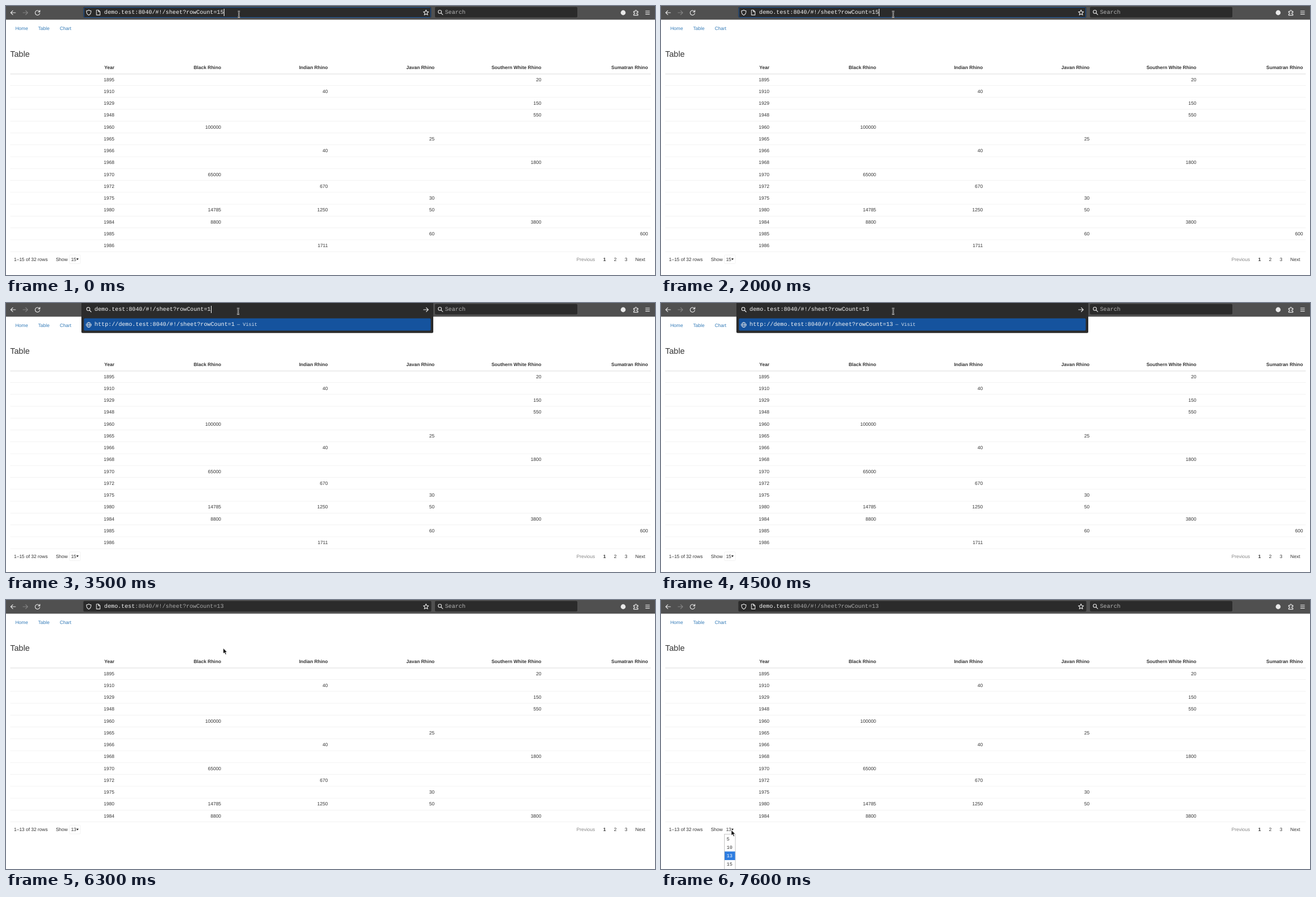
An HTML page that plays this animation: 1162x482 px, repeating every 8 s.

```html
<!DOCTYPE html>
<html lang="en">
<head>
<meta charset="utf-8">
<title>Table paging</title>
<style>
  html, body { margin: 0; width: 100%; height: 100%; overflow: hidden; background: #fff; }
  svg { display: block; width: 1162px; height: 482px; }
  text { font: 8.51px "Liberation Sans", Arial, sans-serif; fill: #333; text-rendering: geometricPrecision; white-space: pre; }
  .bold { font-weight: 700; }
  .right { text-anchor: end; }
  .mono { font: 10.2px "Liberation Mono", "Courier New", monospace; fill: #f6f6f6; }
  .small { font-size: 8.6px; }
  .link { fill: #337ab7; }
  .icon { fill: none; stroke: #e8e8e8; stroke-width: 1.1; stroke-linecap: round; stroke-linejoin: round; }
</style>
</head>
<body>
<svg id="stage" viewBox="0 0 1162 482" xmlns="http://www.w3.org/2000/svg">
  <rect width="1162" height="482" fill="#fff"/>
  <g id="page">
    <text class="link" x="16.7" y="42.6">Home</text>
    <text class="link" x="57.6" y="42.6">Table</text>
    <text class="link" x="96.2" y="42.6">Chart</text>
    <text x="7.4" y="91.3" style="font-size:14.6px">Table</text>
    <rect x="7.5" y="121.2" width="1147" height="1.2" fill="#000" opacity=".12"/>
    <g id="table"></g>
    <g id="pager">
      <text id="info" x="14.2" y="456.8"></text>
      <text x="89.2" y="456.8">Show</text>
      <rect id="selectBox" x="113.6" y="446" width="19.6" height="15.6" rx="1.5" fill="none" stroke="#ececec" stroke-width=".7"/>
      <text id="size" x="116.4" y="456.8"></text>
      <path d="M126 452.2h4l-2 3.4z" fill="#222"/>
      <text x="1021.5" y="456.8" style="fill:#868686">Previous</text>
      <text class="bold" x="1069.2" y="456.8">1</text>
      <text x="1088.5" y="456.8">2</text>
      <text x="1107.7" y="456.8">3</text>
      <text x="1126.8" y="456.8">Next</text>
    </g>
    <g id="menu">
      <rect x="113.5" y="419.8" width="19.6" height="70" fill="#fff" stroke="#aaa" stroke-width=".7"/>
      <rect x="114" y="450.6" width="18.7" height="15.4" fill="#2e7de0"/>
    </g>
  </g>

  <rect width="1162" height="24.5" fill="#505050"/>
  <g class="icon">
    <path d="M17 12H8.6m3.6-3.7L8.5 12l3.7 3.7"/>
    <path d="M30.4 12h8.4m-3.6-3.7L38.9 12l-3.7 3.7" stroke="#858585"/>
    <path d="M60.2 10.4a4.2 4.2 0 1 0 .3 2.7M60.7 7.6v3h-3"/>
    <circle cx="1105" cy="12" r="4.4" fill="#e8e8e8" stroke="none"/>
    <path d="M1123.8 9.6h2.6v-.7a1.4 1.4 0 0 1 2.8 0v.7h2.3v2.3h-1a1.3 1.3 0 0 0 0 2.6h1v2.1h-7.7v-2.1h.8a1.3 1.3 0 0 0 0-2.6h-.8z"/>
    <path d="M1145.2 9h7m-7 2.8h7m-7 2.8h7"/>
  </g>
  <rect x="768" y="1.8" width="255" height="18.8" rx="2" fill="#2b2b2b"/>
  <g class="icon"><circle cx="776.8" cy="10.4" r="2.9"/><path d="M779 12.6l3 3"/></g>
  <text class="mono" x="786" y="14.3" style="fill:#b4b4b4">Search</text>

  <rect id="field" x="138.5" y="1.8" width="623" height="19" rx="2" fill="#2b2b2b"/>
  <rect id="focusRing" x="139.5" y="2.5" width="621" height="18" rx="2" fill="none" stroke="#15539e"/>
  <g id="popup">
    <rect x="135" y="-3" width="630" height="56.7" rx="2" fill="#2b2b2b"/>
    <rect x="139.5" y="27.6" width="621" height="22" rx="2" fill="#15539e"/>
    <g class="icon" style="stroke-width:.9">
      <circle cx="148.2" cy="39.2" r="4.4"/>
      <ellipse cx="148.2" cy="39.2" rx="1.9" ry="4.4"/>
      <path d="M143.8 39.2h8.8"/>
    </g>
    <text id="suggestion" class="mono" x="158.6" y="41.2"></text>
    <text id="visit" class="mono small" y="41.2" style="fill:#dce6f2">— Visit</text>
  </g>
  <g id="siteIcons" class="icon">
    <path d="M148.2 7.3q2 1.5 4 1.3.5 5.6-4 7.8-4.5-2.2-4-7.8 2 .2 4-1.3z"/>
    <path d="M162 7.3h3.6l2.8 2.8v6h-6.4zM165.5 7.5v2.8h2.8"/>
    <path id="star"/>
  </g>
  <g id="typingIcons" class="icon">
    <circle cx="147.3" cy="10.8" r="2.9"/><path d="M149.5 13l3 3"/>
    <path d="M747.6 12h8.4m-3.6-3.7L756.1 12l-3.7 3.7"/>
  </g>
  <text class="mono" y="14.3" id="address"><tspan id="host"></tspan><tspan id="path"></tspan></text>
  <rect id="caret" y="5" width="1" height="13" fill="#fff"/>

  <g id="beam" fill="none">
    <path d="M-2 0q2 0 2 1.5v7.5q0 1.5-2 1.5M2 0q-2 0-2 1.5M0 9q0 1.5 2 1.5" stroke="#f4f4f4" stroke-width="2.2"/>
    <path d="M-2 0q2 0 2 1.5v7.5q0 1.5-2 1.5M2 0q-2 0-2 1.5M0 9q0 1.5 2 1.5" stroke="#111" stroke-width=".9"/>
  </g>
  <path id="arrow" d="M0 0v9.4l2.2-2 1.7 3.8 1.6-.7-1.7-3.7h3z" fill="#000" stroke="#fff" stroke-width=".6"/>
</svg>
<script>
const LOOP = 8000, STEP = 100, CHAR = 6.12, ROW = 21.265, COLUMN = 191.1;
const HOST = 'demo.test', PATH = ':8040/#!/sheet?rowCount=';
const $ = id => document.getElementById(id);
const show = (id, on) => $(id).setAttribute('display', on ? 'inline' : 'none');
const moveTo = (id, x, y) => $(id).setAttribute('transform', `translate(${x} ${y})`);

function add(parent, tag, attrs, content = '') {
  const node = document.createElementNS('http://www.w3.org/2000/svg', tag);
  for (const key in attrs) node.setAttribute(key, attrs[key]);
  node.textContent = content;
  return parent.appendChild(node);
}

function cell(parent, column, y, content, weight = '') {
  add(parent, 'text', { x: 194 + COLUMN * column, y, class: 'right ' + weight }, content);
}

// Each row: year, then column:count pairs.
const rows = `1895 4:20|1910 2:40|1929 4:150|1948 4:550|1960 1:100000|1965 3:25|1966 2:40|1968 4:1800
1970 1:65000|1972 2:670|1975 3:30|1980 1:14785 2:1250 3:50|1984 1:8800 4:3800|1985 3:60 5:600|1986 2:1711`
  .split(/[|\n]/);

['Year', 'Black Rhino', 'Indian Rhino', 'Javan Rhino', 'Southern White Rhino', 'Sumatran Rhino']
  .forEach((name, i) => cell($('table'), i, 113.4, name, 'bold'));

const rowNodes = rows.map((row, i) => {
  const group = add($('table'), 'g', {});
  const [year, ...counts] = row.split(' ');
  const y = 134.55 + ROW * i;
  cell(group, 0, y, year);
  for (const pair of counts) {
    const [column, count] = pair.split(':');
    cell(group, +column, y, count);
  }
  add(group, 'rect', { x: 7.5, y: 142.1 + ROW * i, width: 1147, height: .7, opacity: .075 });
  return group;
});

[5, 10, 13, 15].forEach((size, i) => add($('menu'), 'text', {
  x: 117.6, y: 430.5 + 15.25 * i, class: 'mono small', style: `fill:${size === 13 ? '#fff' : '#333'}`
}, size));

$('star').setAttribute('d', 'M' + Array.from({ length: 10 }, (_, i) => {
  const r = i % 2 ? 2.3 : 5, a = Math.PI * (i / 5 - .5);
  return `${(752 + r * Math.cos(a)).toFixed(2)} ${(12 + r * Math.sin(a)).toFixed(2)}`;
}).join('L') + 'z');

const progress = (t, from, to) => Math.min(1, Math.max(0, (t - from) / (to - from)));
const mix = (a, b, k) => a + (b - a) * k;

function pointer(t) {
  const sweep = 1 - (1 - progress(t, 6300, 7000)) ** 2;
  const settle = progress(t, 7000, 7500);
  return [mix(mix(389, 118.6, sweep), 126, settle), mix(mix(86.6, 424, sweep), 412.4, settle)];
}

function render(time) {
  const t = Math.floor(time / STEP) * STEP;
  const focused = t < 5000;
  const typing = t >= 3400 && focused;
  const popup = t >= 3500 && focused;
  const reloaded = t >= 5100;
  const menuOpen = t >= 7600;
  const pageSize = reloaded ? 13 : 15;
  const query = t < 3300 ? '15' : t < 3700 ? '1' : '13';
  const url = HOST + PATH + query;
  const left = typing ? 158.6 : 175.8;

  $('host').textContent = HOST;
  $('path').textContent = PATH + query;
  $('path').style.fill = reloaded ? '#a9a9a9' : '#f6f6f6';
  $('address').setAttribute('x', left);
  $('caret').setAttribute('x', Math.round(left + CHAR * url.length));
  show('caret', t < 800 || (t >= 2000 && t < 4500));

  show('focusRing', focused && !popup);
  show('siteIcons', !typing);
  show('typingIcons', typing);
  show('popup', popup);
  $('suggestion').textContent = 'http://' + url;
  $('visit').setAttribute('x', 162.8 + CHAR * (url.length + 7));

  rowNodes.forEach((node, i) => node.setAttribute('display', i < pageSize ? 'inline' : 'none'));
  moveTo('pager', 0, (pageSize - 15) * ROW);
  $('info').textContent = `1–${pageSize} of 32 rows`;
  $('size').textContent = pageSize;
  show('selectBox', !menuOpen);
  show('menu', menuOpen);

  show('beam', t < 6300);
  moveTo('beam', t < 100 ? 417 : 415.7, 9.6);
  show('arrow', t >= 6300);
  moveTo('arrow', ...pointer(t));
}

const start = performance.now();
function tick() {
  render((performance.now() - start) % LOOP);
  requestAnimationFrame(tick);
}
tick();
</script>
</body>
</html>
```
